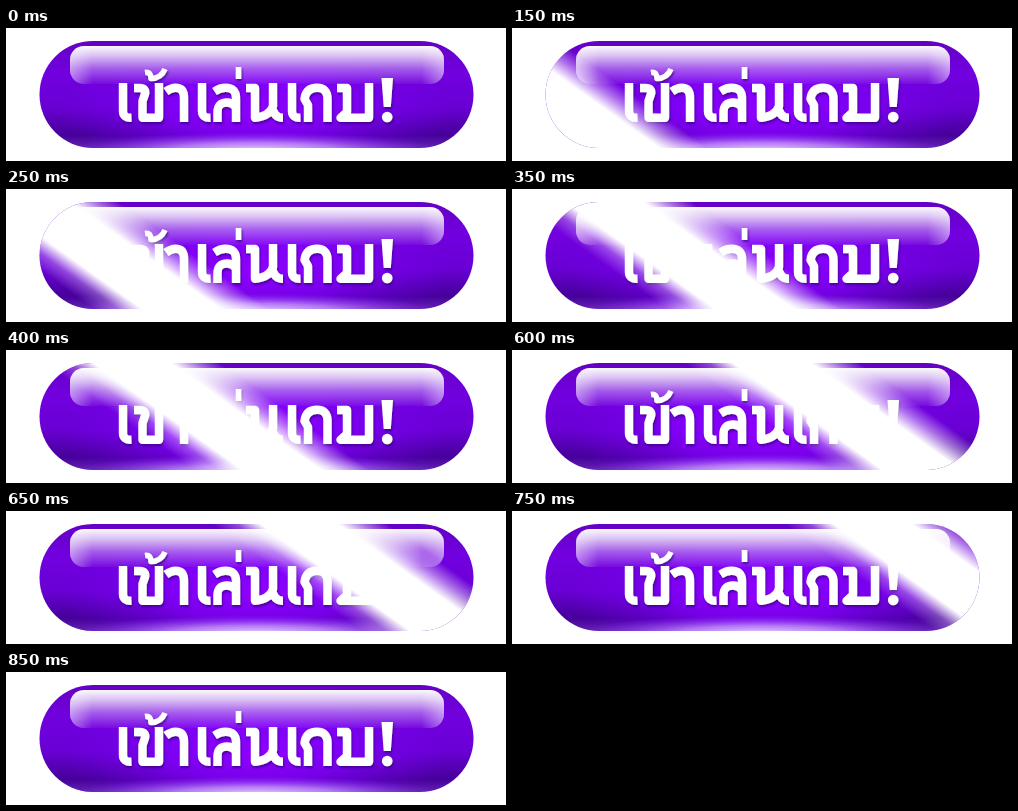
Recreate the animation shown at these times as an HTML page. Size 500 by 133 pixels, loop 1400 ms.

```html
<!DOCTYPE html>
<html lang="th">
<head>
<meta charset="utf-8">
<title>เข้าเล่นเกม!</title>
<style>
  html, body { margin: 0; width: 100%; height: 100%; overflow: hidden; background: #fff; }
  svg { display: block; width: 100vw; height: 100vh; }
  .label { fill: none; stroke: #fff; stroke-width: 8.4; stroke-linejoin: round; }
  .label .mark { stroke-width: 5.6; }
  .label .solid { fill: #fff; stroke: none; }
</style>
</head>
<body>
<svg viewBox="0 0 500 133" role="img" aria-label="เข้าเล่นเกม!">
  <defs>
    <linearGradient id="body" x1="0" y1="0" x2="0" y2="1">
      <stop offset="0" stop-color="#6400c4"/>
      <stop offset=".3" stop-color="#7200e0"/>
      <stop offset=".62" stop-color="#6900d4"/>
      <stop offset=".88" stop-color="#46009a"/>
      <stop offset="1" stop-color="#6420b4"/>
    </linearGradient>
    <radialGradient id="core">
      <stop offset="0" stop-color="#9000ff"/>
      <stop offset=".45" stop-color="#8600ff" stop-opacity=".75"/>
      <stop offset="1" stop-color="#7800f0" stop-opacity="0"/>
    </radialGradient>
    <radialGradient id="glow">
      <stop offset="0" stop-color="#f4eaff" stop-opacity=".95"/>
      <stop offset=".45" stop-color="#cfa4ff" stop-opacity=".7"/>
      <stop offset="1" stop-color="#8a2cff" stop-opacity="0"/>
    </radialGradient>
    <linearGradient id="gloss" x1="0" y1="0" x2="0" y2="1">
      <stop offset="0" stop-color="#fff" stop-opacity=".98"/>
      <stop offset=".25" stop-color="#fff" stop-opacity=".76"/>
      <stop offset=".6" stop-color="#fff" stop-opacity=".36"/>
      <stop offset="1" stop-color="#fff" stop-opacity=".04"/>
    </linearGradient>
    <linearGradient id="rim">
      <stop offset="0" stop-color="#fff" stop-opacity=".4"/>
      <stop offset=".06" stop-color="#fff" stop-opacity="0"/>
      <stop offset=".94" stop-color="#fff" stop-opacity="0"/>
      <stop offset="1" stop-color="#fff" stop-opacity=".4"/>
    </linearGradient>
    <linearGradient id="beam">
      <stop offset="0" stop-color="#fff" stop-opacity="0"/>
      <stop offset=".14" stop-color="#fff" stop-opacity=".28"/>
      <stop offset=".28" stop-color="#fff"/>
      <stop offset=".72" stop-color="#fff"/>
      <stop offset=".86" stop-color="#fff" stop-opacity=".45"/>
      <stop offset="1" stop-color="#fff" stop-opacity="0"/>
    </linearGradient>
    <clipPath id="pill"><rect x="33.5" y="13" width="434" height="107" rx="53.5"/></clipPath>
    <filter id="shade" x="-5%" y="-15%" width="110%" height="140%">
      <feDropShadow dx="1" dy="2" stdDeviation="1.2" flood-color="#35007c" flood-opacity=".7"/>
    </filter>
  </defs>

  <g clip-path="url(#pill)">
    <rect x="33" y="13" width="435" height="107" fill="url(#body)"/>
    <ellipse cx="250" cy="82" rx="195" ry="62" fill="url(#core)"/>
    <ellipse cx="250" cy="123" rx="190" ry="19" fill="url(#glow)"/>
    <rect x="64" y="18" width="374" height="38" rx="14" fill="url(#gloss)"/>
    <rect x="64" y="18" width="374" height="38" rx="14" fill="url(#rim)"/>

    <g class="label" filter="url(#shade)">
      <!-- เข้า -->
      <path d="M117 55V83Q117 90 125.500 89.800"/>
      <path d="M128 60H133.500Q140.500 60 139 66L136.500 73V89.800H153V55"/>
      <path class="mark" d="M139 44.500Q145 43.500 145 50.500Q155 50.500 159 41"/>
      <path d="M160 63.500Q165 59.800 169.500 59.800Q178 59.800 178 70V94"/>
      <!-- เล่น -->
      <path d="M196 55V83Q196 90 204.500 89.800"/>
      <path d="M208.500 63.500Q214 59.800 219.500 59.800Q230 59.800 230 70V94M230 79Q226 74.500 221 74.500Q211.500 74.500 211.500 84V94"/>
      <path class="mark" d="M232.500 39V51"/>
      <path d="M240 60H249V89.800Q264 88 267 78V55M266 79Q268 89.800 277 89.800"/>
      <!-- เกม -->
      <path d="M286 55V83Q286 90 294.500 89.800"/>
      <path d="M302 94V77L298.500 71Q300 59.800 311 59.800Q321.500 59.800 321.500 71V94"/>
      <path d="M331 60H341V84L334.500 89.800H363V55"/>
      <path class="solid" d="M375.500 50H387L384.800 79H377.700Z"/>
      <circle class="solid" cx="381.200" cy="89" r="5.300"/>
    </g>

    <g id="shine">
      <rect x="-88" y="-75" width="176" height="150" fill="url(#beam)" transform="skewX(54.500)"/>
    </g>
  </g>
</svg>
<script>
  const LOOP = 1400, STEP = 50, START = 100, END = 850;
  const FROM = 0, SPEED = 0.67;
  const shine = document.getElementById('shine');

  function draw(now) {
    const t = Math.floor((now % LOOP) / STEP) * STEP;
    const on = t >= START && t < END;
    const x = FROM + SPEED * (t - START);
    shine.setAttribute('visibility', on ? 'visible' : 'hidden');
    shine.setAttribute('transform', `translate(${x} 66.5)`);
  }

  const began = performance.now();
  function tick() {
    draw(performance.now() - began);
    requestAnimationFrame(tick);
  }
  tick();
</script>
</body>
</html>
```
